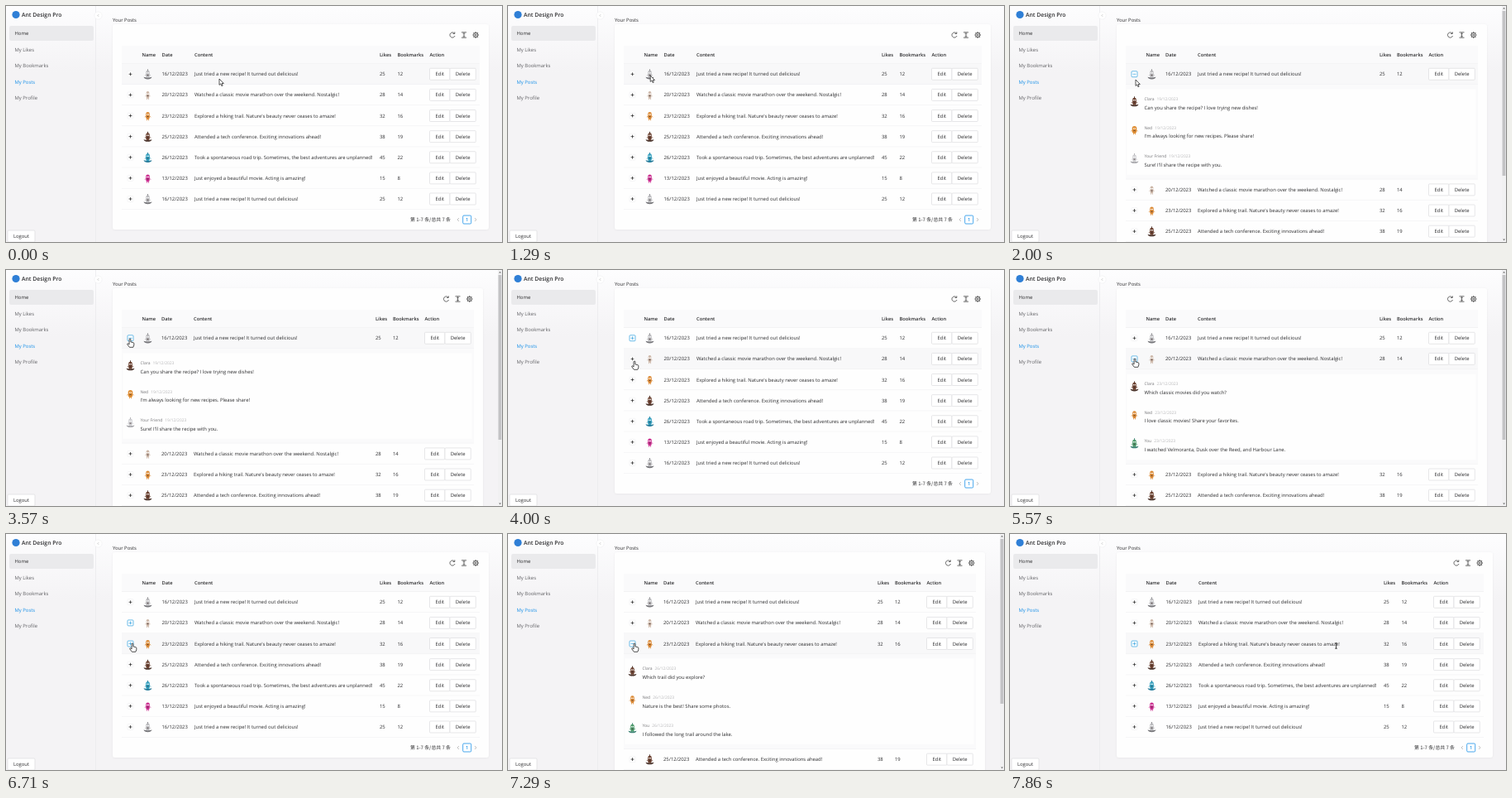
These frames come from a looping animation (600x285 px, 8 s). An HTML page:

```html
<!DOCTYPE html>
<html lang="en">
<head>
<meta charset="utf-8">
<title>Your Posts</title>
<style>
  html, body { margin: 0; width: 100%; height: 100%; overflow: hidden; background: #fff; }
  svg { display: block; width: 600px; height: 285px; }
  text { font: 5.9px "Open Sans", "Noto Sans", sans-serif; fill: #2c2c2e; text-rendering: geometricPrecision; white-space: pre; }
  .head { font-weight: 600; font-size: 5.75px; }
  .brand { font-weight: 600; font-size: 6.8px; }
  .menu { fill: #626266; }
  .active { fill: #1890e8; }
  .name { font-size: 5px; fill: #77777a; }
  .date { font-size: 4.9px; fill: #b8b8ba; }
  .cjk { font-family: "Noto Sans CJK SC", "Noto Sans CJK", sans-serif; }
  .icon { fill: none; stroke: #444; stroke-width: .8; }
</style>
</head>
<body>
<svg id="stage" viewBox="0 0 600 285"></svg>
<script>
const LOOP = 8000, FPS = 7;
const ROW_TOP = 69.7, ROW_H = 25.12, PANEL_H = 114.5;
const BLUE = '#48abe2';

const POSTS = [
  ['ghost', '16/12/2023', 'Just tried a new recipe! It turned out delicious!', 25, 12],
  ['slim', '20/12/2023', 'Watched a classic movie marathon over the weekend. Nostalgic!', 28, 14],
  ['orange', '23/12/2023', "Explored a hiking trail. Nature's beauty never ceases to amaze!", 32, 16],
  ['brown', '25/12/2023', 'Attended a tech conference. Exciting innovations ahead!', 38, 19],
  ['teal', '26/12/2023', 'Took a spontaneous road trip. Sometimes, the best adventures are unplanned!', 45, 22],
  ['pink', '13/12/2023', 'Just enjoyed a beautiful movie. Acting is amazing!', 15, 8],
  ['ghost', '16/12/2023', 'Just tried a new recipe! It turned out delicious!', 25, 12]
];

const COMMENTS = [
  ['19/12/2023',
    ['brown', 'Clara', 'Can you share the recipe? I love trying new dishes!'],
    ['round', 'Ned', "I'm always looking for new recipes. Please share!"],
    ['pale', 'Your Friend', "Sure! I'll share the recipe with you."]],
  ['23/12/2023',
    ['brown', 'Clara', 'Which classic movies did you watch?'],
    ['orange', 'Ned', 'I love classic movies! Share your favorites.'],
    ['green', 'You', 'I watched Velmoranta, Dusk over the Reed, and Harbour Lane.']],
  ['26/12/2023',
    ['brown', 'Clara', 'Which trail did you explore?'],
    ['orange', 'Ned', 'Nature is the best! Share some photos.'],
    ['green', 'You', 'I followed the long trail around the lake.']]
];

// body colour, body width, dish colour
const FIGURES = {
  ghost: ['#b9b9bc', 4.4, '#77777b'],
  pale: ['#cfcfd2', 4.6, '#aaaaae'],
  slim: ['#cbb5a6', 3.6, ''],
  orange: ['#dc8a35', 4.6, ''],
  round: ['#df8d32', 5.6, ''],
  brown: ['#6b4130', 4.6, '#4a342c'],
  teal: ['#2f9dbd', 4.8, '#287c9b'],
  pink: ['#cc2f91', 4.6, ''],
  green: ['#4f9b6c', 4.6, '#3d8375']
};

// step, open row, highlighted toggles, hovered row
const STATES = [
  [0, -1, [], 0], [11, -1, [0], 0], [12, 0, [0], 0], [26, -1, [0], 0],
  [27, -1, [0], 1], [30, -1, [0, 1], 1], [33, 1, [1], 1], [40, -1, [1], 1],
  [44, -1, [1], 2], [46, -1, [1, 2], 2], [48, 2, [2], 2], [53, -1, [2], 2]
];

// step, x, y, pointer shape from this step on
const POINTER = [
  [0, 258, 88, 'arrow'], [4, 258, 88, 'arrow'], [11, 151, 83, 'hand'],
  [13, 151, 85, 'arrow'], [14, 152, 89, 'arrow'], [20, 152, 89, 'arrow'],
  [23, 150, 83, 'hand'], [26, 150, 83, 'hand'], [28, 153, 110, 'hand'],
  [32, 151, 107, 'hand'], [43, 151, 107, 'hand'], [46, 153, 132, 'hand'],
  [53, 153, 132, 'hand'], [54, 250, 134, 'beam'], [55, 394.5, 135, 'beam']
];

const SHAPES = {
  arrow: '<path d="M0 0V7.4L1.7 5.9 2.9 8.6 4.1 8.1 3 5.5H5.3Z" fill="#fff" stroke="#222" stroke-width=".75"/>',
  hand: '<path d="M-.9.9a.9.9 0 0 1 1.8 0v3l3.4.9q.5.2.5.8v2.2l-1 2.5h-4.4l-2.7-3.6q0-1 .9-.9l1.5 1z" fill="#fff" stroke="#222" stroke-width=".8"/>',
  beam: '<path d="M-1.4-3.2H1.4M-1.4 3.2H1.4M0-3.2V3.2" fill="none" stroke="#222" stroke-width=".8"/>'
};

const stage = document.getElementById('stage');

const text = (x, y, str, cls = '', anchor = 'start') =>
  `<text x="${x}" y="${y + 2.1}" class="${cls}" text-anchor="${anchor}">${str}</text>`;
const rect = (x, y, w, h, fill, extra = '') =>
  `<rect x="${x}" y="${y}" width="${w}" height="${h}" fill="${fill}" ${extra}/>`;
const path = (d, extra = 'class="icon"') => `<path d="${d}" ${extra}/>`;
const at = (x, y, body) => `<g transform="translate(${x} ${y})">${body}</g>`;

function button(x, y, w, label) {
  return rect(x, y - 7, w, 14, '#fff', 'rx="1" stroke="#dcdcde" stroke-width=".7"') +
    text(x + w / 2, y, label, '', 'middle');
}

function figure(kind, x, y) {
  const [color, w, dish] = FIGURES[kind], r = w / 2;
  return at(x, y,
    path(`M${-r} 0L${-r - 1.2} 1.4M${r} 0L${r + 1.2} 1.4M-1 3V5.4M1 3V5.4`, `stroke="${color}" stroke-width=".8"`) +
    (dish ? `<path d="M-5 3.2Q0 4.6 5 3.2Q4 5.8 0 5.8T-5 3.2Z" fill="${dish}"/>` +
      path('M0-4V-6.2', `stroke="${dish}"`) : '') +
    rect(-r, -4.8, w, 8.8, color, `rx="${r}"`) +
    `<circle cx="-.9" cy="-1.8" r=".75" fill="#fff"/><circle cx=".9" cy="-1.8" r=".75" fill="#fff"/>` +
    rect(-1, .4, 2, .8, '#3a2a2a'));
}

function toggle(y, open, lit) {
  return rect(147, y - 3.5, 7, 7, '#fff', `rx="1" stroke="${lit ? BLUE : '#f3f3f4'}" stroke-width=".8"`) +
    path(`M148.6 ${y}h3.8` + (open ? '' : `M150.5 ${y - 1.9}v3.8`),
      `stroke="${lit ? BLUE : '#333'}" stroke-width=".8"`);
}

function sidebar() {
  const items = ['Home', 'My Likes', 'My Bookmarks', 'My Posts', 'My Profile'];
  return rect(108, 0, .7, 285, '#e9e9eb') +
    '<circle cx="12" cy="10.5" r="4.6" fill="#2f7fd6"/>' +
    text(19, 10.4, 'Ant Design Pro', 'brand') +
    rect(4, 24, 102, 18, '#eaeaec', 'rx="2"') +
    items.map((s, i) => text(10.5, 33 + i * 19.5, s, ['', 'menu', 'menu', 'active', 'menu'][i])).join('') +
    '<circle cx="111.5" cy="11.5" r="4.6" fill="#fff" stroke="#eeeef0" stroke-width=".6"/>' +
    path('M112.2 10.2l-1.3 1.3 1.3 1.3', 'fill="none" stroke="#aaa" stroke-width=".6"') +
    button(2, 278, 33, 'Logout');
}

function toolbar(x) {
  const teeth = [...Array(8)].map((_, i) =>
    `<path d="M0-2.6V-3.7" transform="rotate(${i * 45})" class="icon" style="stroke-width:1.2"/>`).join('');
  return at(x, 35, path('M2.4-2A3.1 3.1 0 1 0 3 1M2.8-3.6V-1.5H.7')) +
    at(x + 14, 35, path('M-3-3.2H3M-3 3.2H3M0-2.4V2.4M-1.2-1.2L0-2.4 1.2-1.2M-1.2 1.2L0 2.4 1.2 1.2')) +
    at(x + 28.2, 35, teeth + '<circle r="2.6" class="icon"/><circle r="1" class="icon"/>');
}

function panel(row, top, right) {
  const [date, ...list] = COMMENTS[row];
  return rect(140, top, right - 140, PANEL_H, '#fafafb') +
    rect(141.5, top + 5.5, right - 144, PANEL_H - 11, '#fefefe') +
    list.map(([kind, name, str], i) => {
      const y = top + 17.2 + i * 34.4;
      return figure(kind, 150.5, y + 3.5) +
        text(162.5, y, `${name}<tspan class="date" dx="3">${date}</tspan>`, 'name') +
        text(162.5, y + 10.8, str);
    }).join('') +
    rect(140, top + PANEL_H - .5, right - 140, .5, '#ededef');
}

function table(open, lit, hover) {
  const wide = open < 0;
  const right = wide ? 573 : 566, shift = wide ? 0 : -6;
  const content = wide ? 228 : 227, date = wide ? 188.5 : 188;
  const likes = wide ? 452 : 447, marks = wide ? 473.5 : 468, action = 512.5 + shift;
  const heads = [[164.5, 'Name'], [date, 'Date'], [content, 'Content'], [likes, 'Likes'], [marks, 'Bookmarks'], [action, 'Action']];
  let out = rect(129, 22, wide ? 455 : 448, wide ? 248 : 363, '#fefefe', 'rx="3" filter="url(#soft)"') +
    toolbar(wide ? 540 : 532.5) +
    rect(140, 48, right - 140, 21.7, '#fafafb') +
    rect(140, 69.2, right - 140, .6, '#ededef') +
    heads.map(([x, s]) => text(x, 59, s, 'head')).join('');
  let top = ROW_TOP;
  POSTS.forEach(([kind, day, str, likeCount, markCount], i) => {
    const y = top + ROW_H / 2;
    if (i === hover) out += rect(140, top, right - 140, ROW_H, '#f8f8f9');
    out += rect(140, top + ROW_H - .5, right - 140, .5, '#ededef') +
      toggle(y, i === open, lit.includes(i)) + figure(kind, 171.5, y + .4) +
      text(date, y, day) + text(content, y, str) +
      text(likes, y, likeCount) + text(marks, y, markCount) +
      button(action, y, 24.5, 'Edit') + button(action + 24.5, y, 31.3, 'Delete');
    top += ROW_H;
    if (i === open) {
      out += panel(i, top, right);
      top += PANEL_H;
    }
  });
  return out + (wide ? pager() : scrollbar());
}

function pager() {
  return text(538, 258, '第 1-7 条/总共 7 条', 'cjk', 'end') +
    path('M548 256l-2 2 2 2M567 256l2 2-2 2', 'fill="none" stroke="#aaa" stroke-width=".7"') +
    rect(552.7, 253, 10, 10, '#fff', 'rx="1.2" stroke="#1890e8" stroke-width=".8"') +
    text(557.7, 258, '1', 'active head', 'middle');
}

function scrollbar() {
  return rect(595, 0, 5, 285, '#f1f1f2') + rect(595.6, 6, 3.8, 199, '#c3c3c5') +
    path('M596.2 3.6l1.4-1.8 1.4 1.8zM596.2 281.4l1.4 1.8 1.4-1.8z', 'fill="#666"');
}

function pointer(step) {
  const i = POINTER.findLastIndex(k => k[0] <= step);
  const a = POINTER[i], b = POINTER[i + 1] || a;
  const u = b === a ? 0 : (step - a[0]) / (b[0] - a[0]);
  const ease = u * u * (3 - 2 * u);
  return at(a[1] + (b[1] - a[1]) * ease, a[2] + (b[2] - a[2]) * ease, SHAPES[a[3]]);
}

const BACKDROP = `<defs>
  <linearGradient id="sky" x2="0" y2="1"><stop stop-color="#fdfdfe"/><stop offset=".28" stop-color="#f4f3f5"/></linearGradient>
  <filter id="soft" x="-5%" y="-5%" width="110%" height="110%"><feDropShadow dx="0" dy=".4" stdDeviation=".8" flood-opacity=".06"/></filter>
</defs>` + rect(0, 0, 600, 285, 'url(#sky)') + sidebar() + text(129, 16.6, 'Your Posts');

let shown = -1;
function draw(now) {
  // the 5 ms lead absorbs the rounding of step times to 10 ms
  const step = Math.floor((now % LOOP + 5) * FPS / 1000) % (LOOP * FPS / 1000);
  if (step !== shown) {
    shown = step;
    const [, open, lit, hover] = STATES.findLast(s => s[0] <= step);
    stage.innerHTML = BACKDROP + table(open, lit, hover) + pointer(step);
  }
  requestAnimationFrame(draw);
}
draw(0);
</script>
</body>
</html>
```
